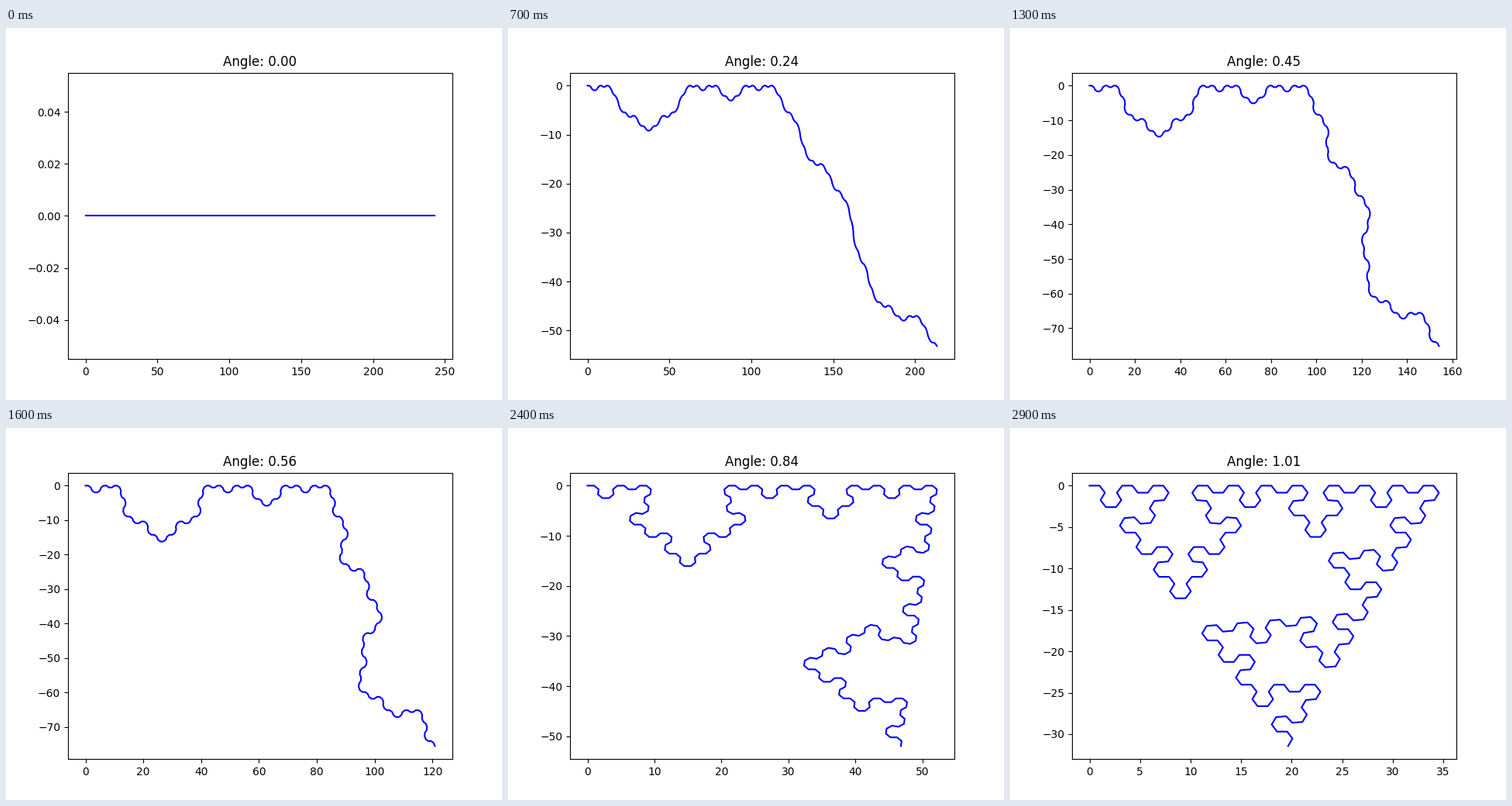
Recreate the animation shown at these times as a matplotlib script. Size 640 px wide and 480 px high, loop 3 s.

```python
import numpy as np
import matplotlib.pyplot as plt
from matplotlib.animation import FuncAnimation

FRAMES = 30
INTERVAL = 100
DEPTH = 5
RULES = {"A": "B-A-B", "B": "A+B+A"}


def expand(word, depth):
    for _ in range(depth):
        word = "".join(RULES.get(c, c) for c in word)
    return word


def turn_counts(word):
    """Heading of every unit segment, in multiples of the turning angle."""
    heading, counts = 0, []
    for c in word:
        if c == "+":
            heading += 1
        elif c == "-":
            heading -= 1
        else:
            counts.append(heading)
    return np.array(counts)


TURNS = turn_counts(expand("A", DEPTH))


def curve(angle):
    x = np.concatenate(([0], np.cumsum(np.cos(TURNS * angle))))
    y = np.concatenate(([0], np.cumsum(np.sin(TURNS * angle))))
    return x, y


fig, ax = plt.subplots(figsize=(6.4, 4.8), dpi=100)


def draw(frame):
    angle = np.pi / 3 * frame / FRAMES
    ax.clear()
    ax.plot(*curve(angle), color="blue")
    ax.set_title(f"Angle: {angle:.2f}")


anim = FuncAnimation(fig, draw, frames=FRAMES, init_func=lambda: None,
                     interval=INTERVAL, repeat=True, repeat_delay=0)
plt.show()
```
